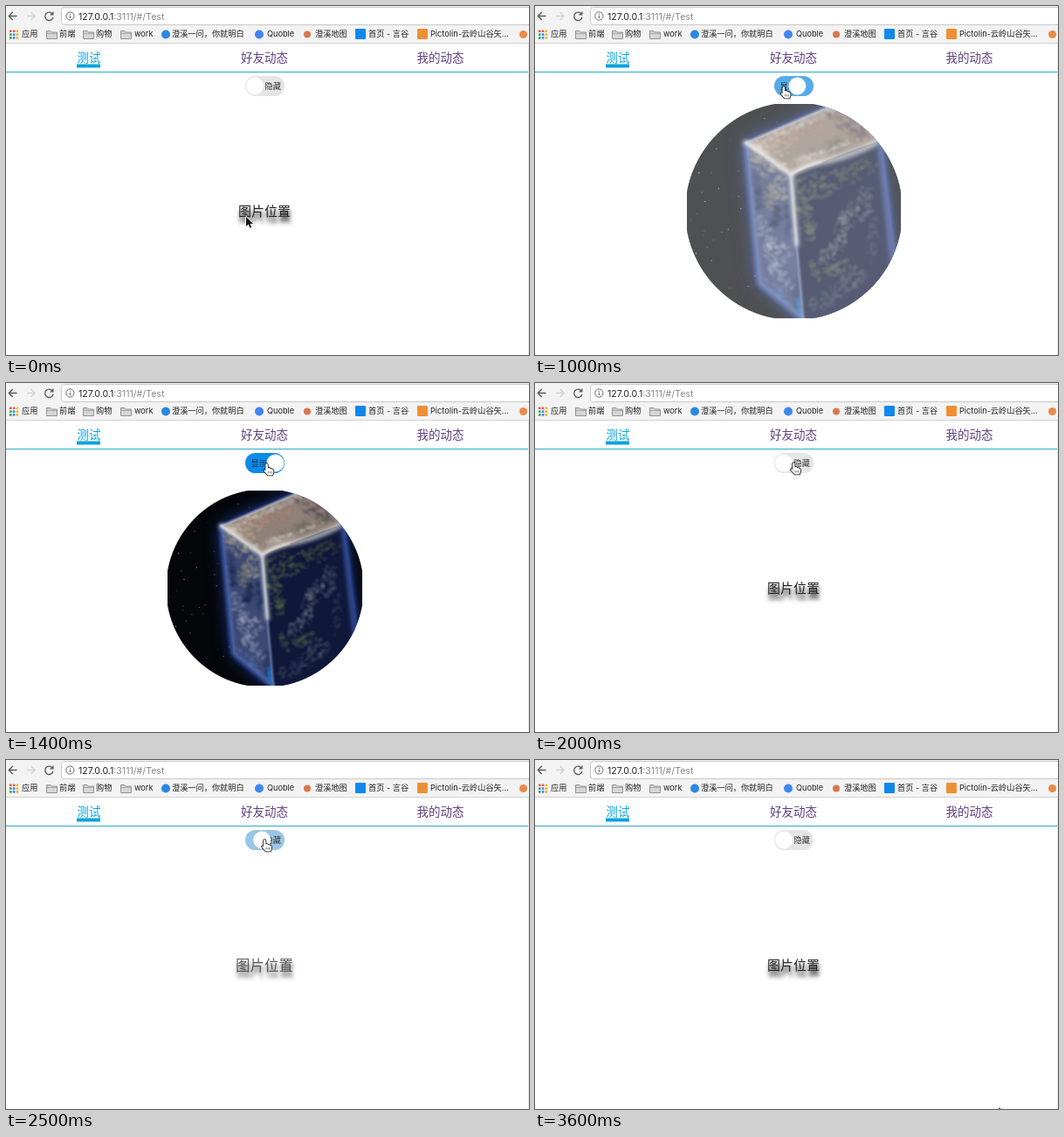
Recreate the animation shown at these times as an HTML page with a canvas. Size 599x399 px, loop 3700 ms.

```html
<!DOCTYPE html>
<html lang="zh-CN">
<head>
<meta charset="utf-8">
<title>Toggle demo</title>
<style>
html, body { margin: 0; width: 100%; height: 100%; overflow: hidden; background: #fff; }
canvas { display: block; width: 599px; height: 399px; }
</style>
</head>
<body>
<canvas id="stage" width="599" height="399"></canvas>
<script>
const LOOP = 3700, STEP = 100, BOUNCE = 350, SLIDE = 170;
const FONT = 'Inter, "Noto Sans CJK SC", "Noto Sans CJK", sans-serif';
const CJK = '"Noto Sans CJK SC", "Noto Sans CJK", sans-serif';
const ctx = document.getElementById('stage').getContext('2d');

// [time, switched on]
const clicks = [[-2000, false], [930, true], [1600, false], [2060, true], [2430, false]];
// [time, x, y]
const mousePath = [
  [100, 275, 241], [700, 284, 92], [1000, 283.5, 92], [1300, 297.5, 92],
  [1900, 295, 91], [2900, 295, 91], [3600, 531.5, 397]
];
const scaleKeys = [0.3, 1.1, 0.9, 1.03, 0.97, 1];

const clamp = v => Math.max(0, Math.min(1, v));
const mix = (a, b, p) => a + (b - a) * p;
const easeOut = p => 1 - (1 - p) ** 3;

function bounceIn(p) {
  const i = Math.min(4, Math.floor(p * 5));
  return {
    scale: mix(scaleKeys[i], scaleKeys[i + 1], easeOut(p * 5 - i)),
    alpha: easeOut(clamp(p / 0.6))
  };
}

function randomFrom(seed) {
  return () => (seed = (seed * 16807) % 2147483647) / 2147483647;
}

function text(c, str, x, y, size, color, font = FONT, weight = 400) {
  c.font = `${weight} ${size}px ${font}`;
  c.fillStyle = color;
  c.fillText(str, x, y + size * 0.38);
  return x + c.measureText(str).width;
}

function disc(c, x, y, r, color) {
  c.fillStyle = color;
  c.beginPath();
  c.arc(x, y, r, 0, 7);
  c.fill();
}

function box(c, x, y, w, h, r, color) {
  c.fillStyle = color;
  c.beginPath();
  c.roundRect(x, y, w, h, r);
  c.fill();
}

function line(c, d, color, width) {
  c.strokeStyle = color;
  c.lineWidth = width;
  c.stroke(new Path2D(d));
}

function layer(w, h, ratio, draw) {
  const el = document.createElement('canvas');
  el.width = w * ratio;
  el.height = h * ratio;
  const c = el.getContext('2d');
  c.scale(ratio, ratio);
  draw(c);
  return el;
}

function folder(c, x) {
  c.fillStyle = '#d6d6d6';
  const p = new Path2D(`M${x} 28.5h4.5l1.5 1.5h6v7.5h-12z`);
  c.fill(p);
  c.strokeStyle = '#8b8b8b';
  c.lineWidth = 0.9;
  c.stroke(p);
  line(c, `M${x} 31.3h12`, '#8b8b8b', 0.7);
}

const page = layer(599, 399, 1, c => {
  c.fillStyle = '#fff';
  c.fillRect(0, 0, 599, 399);
  c.fillStyle = '#f3f3f3';
  c.fillRect(0, 0, 599, 42);
  c.fillStyle = '#d2d2d2';
  c.fillRect(0, 42, 599, 1);

  line(c, 'M12.5 11.5H3.5M7.8 7L3.3 11.5L7.8 16', '#5c5c5c', 1.4);
  line(c, 'M24 11.5H33M28.7 7L33.2 11.5L28.7 16', '#d3d3d3', 1.3);
  line(c, 'M53.2 9A4.7 4.7 0 1 0 54 13', '#5c5c5c', 1.4);
  c.fillStyle = '#5c5c5c';
  c.fill(new Path2D('M54.5 6V10.5H50z'));

  box(c, 63.5, 1.5, 560, 20, 3, '#fff');
  c.strokeStyle = '#c9c9c9';
  c.lineWidth = 1;
  c.stroke();
  line(c, 'M78 11.5A4.6 4.6 0 1 0 68.8 11.5A4.6 4.6 0 1 0 78 11.5', '#666', 1);
  line(c, 'M73.4 10.8V14M73.4 8.7V9.8', '#666', 1.1);
  const end = text(c, '127.0.0.1', 83, 11.5, 10.6, '#222');
  text(c, ':3111/#/Test', end, 11.5, 10.6, '#888');

  const dots = ['#e2574c', '#e2574c', '#f0b429', '#3aa757', '#4285f4', '#f0b429', '#3aa757', '#4285f4', '#f0b429'];
  dots.forEach((color, i) => box(c, 4 + i % 3 * 3.8, 27.5 + Math.floor(i / 3) * 3.8, 2.6, 2.6, 0.5, color));
  [46.5, 88.5, 131.5].forEach(x => folder(c, x));
  disc(c, 183, 32.5, 5, '#2b87e3');
  disc(c, 290, 32.5, 5, '#4285f4');
  disc(c, 345, 32.5, 4, '#d9774f');
  box(c, 400, 26, 12, 12, 1, '#0f88eb');
  box(c, 471, 26, 12, 12, 1, '#ef8f35');
  disc(c, 592.5, 32.5, 4.5, '#e98a4b');

  const marks = [
    ['应用', 18], ['前端', 61], ['购物', 103], ['work', 147], ['澄溪一问，你就明白', 190],
    ['Quoble', 299], ['澄溪地图', 354], ['首页 - 言谷', 415], ['Pictolin-云岭山谷矢…', 486]
  ];
  marks.forEach(([s, x]) => text(c, s, x, 32, 9.2, '#222'));

  text(c, '测试', 81.5, 58.5, 13.5, '#08a3dc', CJK, 500);
  text(c, '好友动态', 269, 58.5, 13.5, '#5f4080', CJK);
  text(c, '我的动态', 470.5, 58.5, 13.5, '#5f4080', CJK);
  c.fillStyle = '#08a3dc';
  c.fillRect(81, 66.5, 27, 4);
  c.fillStyle = '#2fa9c9';
  c.fillRect(0, 75, 599, 1);
  c.fillStyle = '#e6e6e6';
  c.fillRect(598, 43, 1, 356);
});

function face(c, d, color, paint) {
  const p = new Path2D(d);
  c.save();
  c.clip(p);
  c.fillStyle = color;
  c.fill(p);
  paint();
  c.restore();
}

// Soft ragged cluster: many small translucent ellipses, denser in the middle
function patch(c, rnd, x, y, w, h, tilt, color, alpha = 0.35) {
  c.save();
  c.translate(x, y);
  c.rotate(tilt);
  c.fillStyle = color;
  c.globalAlpha = alpha;
  const n = 20 + w * h / 5;
  for (let i = 0; i < n; i++) {
    const a = rnd() * 6.28, r = rnd() ** 0.6;
    c.beginPath();
    c.ellipse(Math.cos(a) * r * w, Math.sin(a) * r * h, 1 + rnd() * 3, 0.7 + rnd() * 1.6, rnd() - 0.5, 0, 7);
    c.fill();
  }
  c.restore();
}

const planet = layer(224, 224, 2, c => {
  const rnd = randomFrom(77);
  c.translate(112, 112);
  // Disc slightly wider than its square frame, so its sides are flat
  c.beginPath();
  c.rect(-111.5, -111.5, 223, 223);
  c.clip();
  c.beginPath();
  c.arc(0, 0, 113.2, 0, 7);
  c.clip();
  c.fillStyle = '#050609';
  c.fillRect(-112, -112, 224, 224);
  for (let i = 0; i < 75; i++) {
    disc(c, -110 + rnd() * 95, -100 + rnd() * 210, 0.25 + rnd() * 0.5, `rgba(190,200,220,${0.2 + rnd() * 0.6})`);
  }

  const outline = new Path2D('M-50 -71L45 -112L89 -73L106 60L120 140L30 130L10 113L-36 75Z');
  c.save();
  c.shadowColor = '#2444a0';
  c.fillStyle = '#17295f';
  [40, 14].forEach(blur => {
    c.shadowBlur = blur;
    c.fill(outline);
  });
  c.restore();

  face(c, 'M-50 -71L45 -112L89 -73Q30 -52 -3 -38Z', '#8f8178', () => {
    c.filter = 'blur(2px)';
    patch(c, rnd, -18, -68, 25, 12, -0.4, '#c4a892');
    patch(c, rnd, 10, -82, 24, 8, -0.4, '#b08479');
    patch(c, rnd, 45, -72, 30, 8, -0.4, '#6c6a5b');
    patch(c, rnd, 56, -90, 24, 9, 0.6, '#4f4554');
    patch(c, rnd, 5, -90, 45, 4, -0.4, '#ddd8d4', 0.25);
    patch(c, rnd, 25, -60, 50, 4, -0.35, '#ddd9d2', 0.25);
    patch(c, rnd, -36, -66, 10, 8, 0.6, '#e0d5c8');
  });

  face(c, 'M-50 -71L-3 -38L10 113L-36 75Z', '#3c4973', () => {
    c.filter = 'blur(2px)';
    patch(c, rnd, -30, -48, 22, 11, 0.65, '#a99d8d');
    patch(c, rnd, -15, -24, 10, 14, 0, '#a19b8c');
    patch(c, rnd, -24, -14, 7, 16, -0.1, '#847f74');
    patch(c, rnd, -39, -20, 5, 22, -0.1, '#1d2a52');
    patch(c, rnd, -20, 8, 6, 14, 0.2, '#162143');
    patch(c, rnd, -5, 10, 5, 18, -0.1, '#202d58');
    patch(c, rnd, -30, 22, 8, 20, -0.2, '#8c97b5', 0.25);
    patch(c, rnd, -17, 42, 17, 13, 0.8, '#a6b0c9', 0.25);
    patch(c, rnd, -13, 68, 20, 8, 0.9, '#a0abc9', 0.25);
    patch(c, rnd, -18, 82, 20, 5, 0.75, '#5673b5', 0.25);
    patch(c, rnd, 3, 86, 4, 16, -0.1, '#26375f');
    patch(c, rnd, 6, 100, 1.5, 12, -0.1, '#1480e0');
  });

  face(c, 'M-3 -38Q30 -52 89 -73L106 60L120 140L13 140L10 113Z', '#10183a', () => {
    c.filter = 'blur(2px)';
    patch(c, rnd, 26, -27, 32, 14, -0.25, '#57604f');
    patch(c, rnd, 66, -42, 22, 11, -0.4, '#444b42');
    patch(c, rnd, 11, -2, 8, 13, -0.2, '#57614d');
    patch(c, rnd, 16, 20, 9, 11, 0.2, '#53614b');
    patch(c, rnd, 43, 58, 14, 9, -0.5, '#4d594a');
    patch(c, rnd, 22, 62, 4, 11, -0.5, '#434f48');
    patch(c, rnd, 55, 10, 9, 24, 0.45, '#8d9298', 0.22);
    patch(c, rnd, 40, 40, 8, 20, 0.8, '#858c96', 0.22);
    patch(c, rnd, 73, -8, 9, 20, 0.2, '#737b82', 0.22);
    patch(c, rnd, 58, 70, 18, 12, -0.5, '#697281', 0.2);
    patch(c, rnd, 36, 91, 23, 10, -0.4, '#535e73', 0.2);
    patch(c, rnd, 82, 30, 6, 24, 0.1, '#3a4561', 0.25);
  });

  c.lineCap = 'round';
  c.filter = 'blur(5px)';
  line(c, 'M-50 -71Q-27 -57 -3 -38Q8 -46 28 -51Q60 -57 89 -73', 'rgba(225,224,218,.75)', 6);
  line(c, 'M-3 -38L3 35', 'rgba(205,210,218,.8)', 5);
  line(c, 'M-50 -71L-36 75L10 113', 'rgba(100,130,215,.8)', 3);
  line(c, 'M89 -73L104 60', 'rgba(65,95,180,.8)', 5);
  c.filter = 'blur(2px)';
  line(c, 'M-50 -71L45 -112', '#c5c6d0', 2);
  line(c, 'M-50 -71L-3 -38Q8 -46 28 -51', '#dfddd7', 2);
  line(c, 'M-3 -38L3 35', '#d0d3d9', 2);
  line(c, 'M3 35L10 113', '#8294bd', 1.6);
});

const arrow = new Path2D('M0 0V11L2.6 8.6L4.4 12.8L6.2 12L4.4 8H8Z');
const hand = new Path2D('M0 1.5Q0 0 1.2 0Q2.5 0 2.5 1.5V5.5L3.5 5Q5 4.8 5.2 6Q6.8 5.5 7 6.8Q8.8 6.3 9 8V10.5L8 13.5H2.5L-1.8 8.8Q-2.5 7.2 -1 7.2L0 8.2Z');

function drawSwitch(on, age) {
  const p = 1 - (1 - clamp(age / SLIDE)) ** 2;
  const k = on ? p : 1 - p;
  const rgb = [[229, 12], [229, 140], [229, 233]].map(([a, b]) => Math.round(mix(a, b, k)));
  box(ctx, 274, 80, 45, 23, 11.5, `rgb(${rgb})`);
  text(ctx, on ? '显示' : '隐藏', on ? 280.5 : 296.5, 91.5, 9.2, on ? '#19334f' : '#333', CJK);
  disc(ctx, mix(285, 308.5, k), 91.5, 10, '#fff');
}

function drawContent(on, age) {
  const { scale, alpha } = bounceIn(clamp(age / BOUNCE));
  ctx.save();
  ctx.globalAlpha = alpha;
  ctx.translate(296.5, 234.5);
  ctx.scale(scale, scale);
  if (on) {
    ctx.drawImage(planet, -112, -112, 224, 224);
  } else {
    ctx.shadowColor = '#000';
    ctx.shadowBlur = 5 * scale;
    ctx.shadowOffsetX = 1 * scale;
    ctx.shadowOffsetY = 6 * scale;
    text(ctx, '图片位置', -30.5, 0, 15, '#222', CJK);
  }
  ctx.restore();
}

function mouseAt(t) {
  const i = mousePath.findIndex(k => k[0] > t);
  if (i === 0) return mousePath[0].slice(1);
  if (i < 0) return mousePath[mousePath.length - 1].slice(1);
  const [t0, x0, y0] = mousePath[i - 1], [t1, x1, y1] = mousePath[i];
  const p = (t - t0) / (t1 - t0), e = p * p * (3 - 2 * p);
  return [mix(x0, x1, e), mix(y0, y1, e)];
}

function drawMouse(t) {
  const [x, y] = mouseAt(t);
  const over = x > 274 && x < 319 && y > 80 && y < 103;
  const shape = over ? hand : arrow;
  ctx.save();
  ctx.translate(x, y);
  ctx.lineJoin = 'round';
  ctx.strokeStyle = over ? '#111' : '#fff';
  ctx.fillStyle = over ? '#fff' : '#111';
  ctx.lineWidth = over ? 1.6 : 1.6;
  ctx.stroke(shape);
  ctx.fill(shape);
  if (over) line(ctx, 'M3 9V11.5M4.9 9V11.5M6.8 9V11.5', '#333', 0.6);
  ctx.restore();
}

function draw(t) {
  const [since, on] = clicks.filter(k => k[0] <= t).pop();
  ctx.drawImage(page, 0, 0);
  drawSwitch(on, t - since);
  drawContent(on, t - since);
  drawMouse(t);
}

const start = performance.now();
function tick() {
  const t = (performance.now() - start) % LOOP;
  draw(Math.floor(t / STEP) * STEP);
  requestAnimationFrame(tick);
}
tick();
</script>
</body>
</html>
```
